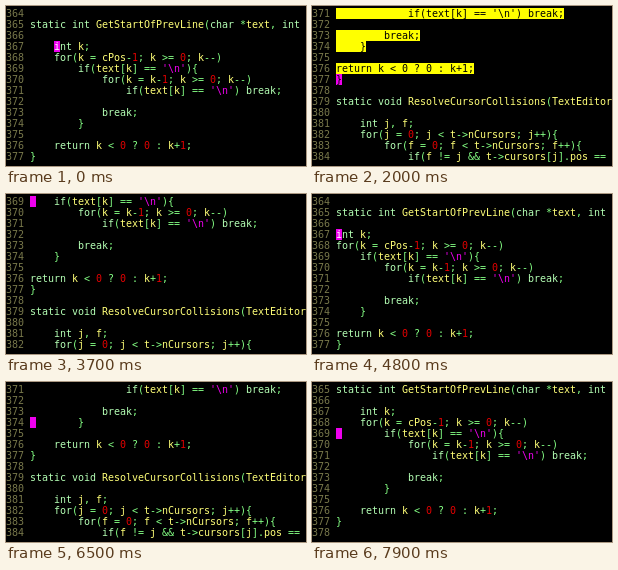
An HTML page with a canvas for the animation above (8 s loop, 300 by 160 pixels).

```html
<!DOCTYPE html>
<html lang="en">
<head>
<meta charset="utf-8">
<title>Block indent in a code editor</title>
<style>
html, body { margin: 0; width: 100%; height: 100%; overflow: hidden; background: #000; }
canvas { display: block; width: 300px; height: 160px; }
</style>
</head>
<body>
<canvas id="stage" width="300" height="160"></canvas>
<script>
const ctx = document.getElementById('stage').getContext('2d');
const LOOP = 8000, STEP = 100;
const CW = 6, ROW = 11, TOP = 2, BASE = 9, LEFT = 24, ROWS = 14;
const FIRST = 364, BLOCK = 367, END = 377;
const COLOR = {
  gutter: '#77774a', keyword: '#b4ffb4', name: '#ffff78', punct: '#84ff84',
  number: '#e00000', string: '#f000f0', select: '#ffff00', cursor: '#ee00ee'
};

const source = String.raw`
static int GetStartOfPrevLine(char *text, int

    int k;
    for(k = cPos-1; k >= 0; k--)
        if(text[k] == '\n'){
            for(k = k-1; k >= 0; k--)
                if(text[k] == '\n') break;

            break;
        }

    return k < 0 ? 0 : k+1;
}

static void ResolveCursorCollisions(TextEditor

    int j, f;
    for(j = 0; j < t->nCursors; j++){
        for(f = 0; f < t->nCursors; f++){
            if(f != j && t->cursors[j].pos ==`.split('\n');

const KEYWORD = /^(static|int|char|void|for|if|return|break)$/;
const TOKEN = /'[^']*'|\w+|[^\w\s']+/g;

function kind(word) {
  if (word[0] === "'") return 'string';
  if (/^\d/.test(word)) return 'number';
  if (KEYWORD.test(word)) return 'keyword';
  return /^\w/.test(word) ? 'name' : 'punct';
}

// Line moves of one key press per step, between two lines
function walk(t, start, from, to) {
  const n = Math.max(0, Math.floor((t - start) / STEP));
  return from < to ? Math.min(to, from + n) : Math.max(to, from - n);
}

function scrollUp(t, start, perLine) {
  return Math.max(FIRST, 371 - Math.max(0, Math.floor((t - start) / perLine)));
}

function stateAt(t) {
  const dedented = t >= 1800 && t < 6100;
  let line, top, selecting = false;
  if (t < 2800) {
    line = walk(t, 0, BLOCK, END);
    top = line === END ? 371 : FIRST;
    selecting = t >= STEP;
  } else if (t < 4800) {
    line = t < 4500 ? walk(t, 2700, END, 369) : walk(t, 4400, 369, BLOCK);
    top = scrollUp(t, 3300, 160);
  } else if (t < 6300) {
    line = walk(t, 4800, BLOCK, END);
    top = line === END ? 371 : FIRST;
    selecting = t >= 4900;
  } else {
    line = walk(t, 6200, END, 369);
    top = scrollUp(t, 6700, 200);
  }
  return { dedented, line, top, selecting, goal: t < 1800 ? 4 : 0 };
}

function lineText(n, dedented) {
  const text = source[n - FIRST] || '';
  return dedented && n >= BLOCK && n < END ? text.replace(/^ {4}/, '') : text;
}

function fillCells(col, count, y, color) {
  ctx.fillStyle = color;
  ctx.fillRect(LEFT + col * CW, y, count * CW, ROW);
}

function drawText(text, col, y, color) {
  ctx.fillStyle = color;
  for (let i = 0; i < text.length; i++) {
    if (text[i] !== ' ') ctx.fillText(text[i], LEFT + (col + i) * CW, y + BASE);
  }
}

function drawLine(n, y, s) {
  const text = lineText(n, s.dedented);
  drawText(String(n), -4, y, COLOR.gutter);
  for (const m of text.matchAll(TOKEN)) drawText(m[0], m.index, y, COLOR[kind(m[0])]);

  const col = Math.max(0, Math.min(s.goal, text.length - 1));
  if (s.selecting && n >= BLOCK && n <= s.line) {
    const from = n === BLOCK ? s.goal : 0;
    const to = n === s.line ? col : text.length;
    if (to > from) {
      fillCells(from, to - from, y, COLOR.select);
      drawText(text.slice(from, to), from, y, '#000');
    }
  }
  if (n === s.line) {
    fillCells(col, 1, y, COLOR.cursor);
    drawText(text.charAt(col), col, y, s.selecting ? '#000' : '#fff');
  }
}

function frame(now) {
  const t = Math.floor((now % LOOP) / STEP) * STEP;
  const s = stateAt(t);
  ctx.fillStyle = '#000';
  ctx.fillRect(0, 0, 300, 160);
  ctx.font = '10px "DejaVu Sans Mono", "Liberation Mono", monospace';
  for (let r = 0; r < ROWS; r++) drawLine(s.top + r, TOP + r * ROW, s);
  requestAnimationFrame(now => frame(now - began));
}

const began = performance.now();
frame(0);
</script>
</body>
</html>
```
